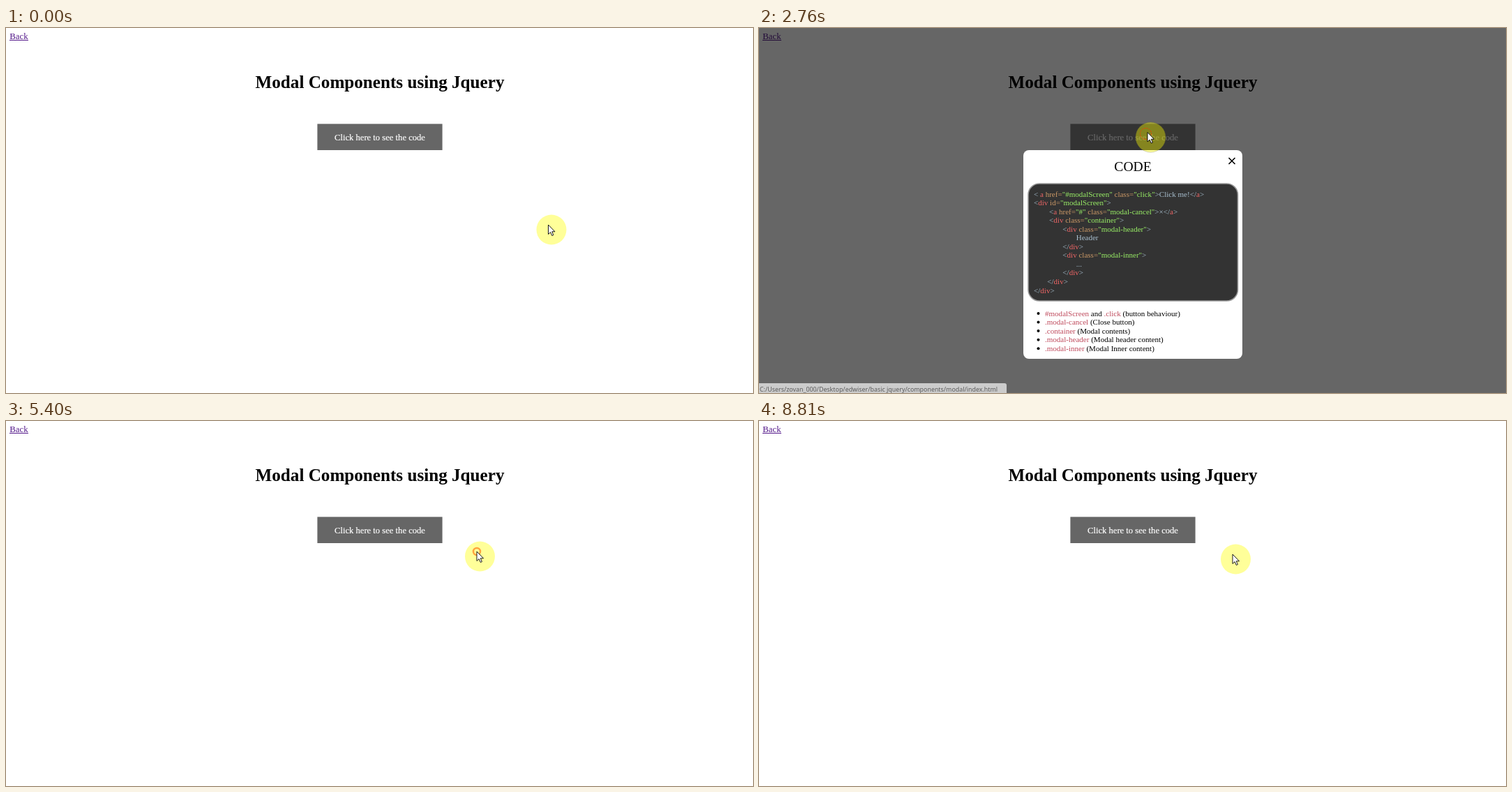
Recreate the animation shown at these times as an HTML page. Size 1071x523 px, loop 8910 ms.

```html
<!DOCTYPE html>
<html lang="en">
<head>
<meta charset="utf-8">
<title>Modal Components</title>
<style>
  html, body { margin: 0; width: 100%; height: 100%; overflow: hidden; background: #fff; }
  svg { display: block; font-family: "Liberation Serif", "Times New Roman", serif; }
  text { white-space: pre; }
  .mid { text-anchor: middle; }
  #code, #list { font-size: 11.04px; }
  #code { fill: #a9c0d0; }
  .tag { fill: #ee6666; }
  .attr { fill: #cc9966; }
  .str { fill: #99ee66; }
  .sel { fill: #bf4a5c; }
  #bar text { font: 8.87px "Noto Sans", "Open Sans", sans-serif; fill: #555; }
  #pointer path { fill: #fff; stroke: #000; stroke-width: .9; stroke-linejoin: round; }
</style>
</head>
<body>
<svg width="1071" height="523" viewBox="0 0 1071 523">
  <text x="5.3" y="15.5" font-size="12.8" fill="#551a8b">Back</text>
  <path d="M5 17.5H32" stroke="#551a8b"/>
  <text class="mid" x="536" y="86" font-size="25.15" font-weight="bold">Modal Components using Jquery</text>
  <rect id="button" x="446.4" y="137.4" width="179.200" height="37.600"/>
  <text class="mid" x="536" y="160.5" font-size="12.62" fill="#fff" stroke="#fff" stroke-width=".2">Click here to see the code</text>

  <g id="modal">
    <rect width="1071" height="523" opacity=".6"/>
    <rect x="379" y="175" width="314" height="299" rx="8" fill="#fff"/>
    <text class="mid" x="536" y="205" font-size="19.6">CODE</text>
    <path d="M673.5 186l9 9m0-9l-9 9" stroke="#000" stroke-width="1.6"/>
    <rect x="386" y="223" width="300.5" height="168" rx="16" fill="#333" stroke="#999" stroke-width="1.6"/>
    <g id="code"></g>
    <g id="list"></g>
  </g>

  <g id="bar">
    <path d="M0 523V509H352Q355 509 355 512V523Z" fill="#fff"/>
    <path id="edge" d="M0 508.5H353M355.5 511V523" stroke="#bbb"/>
    <text x="1" y="520.5">C:/Users/zovan_000/Desktop/edwiser/basic jquery/components/modal/index.html</text>
  </g>

  <circle id="halo" r="21.5" fill="#ff0" stroke="#663"/>
  <circle id="ring" fill="none"/>
  <g id="pointer">
    <path id="arrow" d="M0 0V13.500L3.100 10.600 5.300 15.500 7.400 14.600 5.300 9.800H9.500Z"/>
    <path id="hand" transform="translate(2.5 -1.500)"
      d="M-1.500 10V1.500Q0-.5 1.500 1.500V6Q3 5 4 6.500Q5.500 5.500 6.300 7Q8 6.500 8 8.500V12L6.500 15V17H-.5V15L-4.500 10.500Q-4.500 8-1.500 10Z"/>
  </g>
</svg>
<script>
const $ = id => document.getElementById(id);
const LOOP = 8910, REST = 1000, STEP = 110, LINE = 12.55;

const code = `< a href="#modalScreen" class="click">Click me!</a>
<div id="modalScreen">
        <a href="#" class="modal-cancel">×</a>
        <div class="container">
               <div class="modal-header">
                      Header
               </div>
               <div class="modal-inner">
                      ...
               </div>
       </div>
</div>`;
const notes = `#modalScreen and .click (button behaviour)
.modal-cancel (Close button)
.container (Modal contents)
.modal-header (Modal header content)
.modal-inner (Modal Inner content)`;

const span = (kind, s) => `<tspan class="${kind}">${s}</tspan>`;
const paintCode = line => line.replace(/("[^"]*")|(\w+=)|(<\/? ?)(\w+)/g, (_, str, attr, open, tag) =>
  str ? span('str', str) : attr ? span('attr', attr) : open.replace('<', '&lt;') + span('tag', tag));
const paintNote = line => line.replace(/[#.][\w-]+/g, s => span('sel', s));

function typeset(id, source, x, top, paint, bullet = '') {
  $(id).innerHTML = source.split('\n').map((line, i) =>
    `<g transform="translate(${x} ${top + i * LINE})">${bullet}<text>${paint(line)}</text></g>`).join('');
}
typeset('code', code, 394, 241.5, paintCode);
typeset('list', notes, 410, 412.5, paintNote, '<circle cx="-9.5" cy="-3.5" r="2"/>');

// pointer moves: start, end, and where the halo centre arrives
const home = [782, 289];
const moves = [
  [890, 1880, 559, 158.5], [2430, 2540, 561.5, 156.5],
  [3200, 3860, 597, 334.5], [4300, 5290, 679.5, 194],
  [5400, 5840, 592, 175], [6500, 6610, 599, 174],
  [6720, 7270, 675.5, 197], [7710, 8260, 683.5, 198]
];
// click rings: start, moment of widening
const clicks = [[2320, 2430], [2540, 2760], [5400, 5510], [6390, 6500], [6610, 6830], [8370, 8480]];
const opened = [[2540, 5400], [6610, 8480]];
const hovers = [[1770, 2760], [5950, 6830], [7490, 8590]];

const clamp = v => Math.min(1, Math.max(0, v));
const within = (v, a, b) => v >= a && v < b;
const inside = (x, y, l, t, r, b) => within(x, l, r) && within(y, t, b);
const show = (id, on) => $(id).setAttribute('visibility', on ? 'visible' : 'hidden');
const set = (id, attrs) => {
  for (const k in attrs) $(id).setAttribute(k, attrs[k]);
};

const position = t => moves.reduce(([x, y], [start, end, toX, toY]) => {
  const u = clamp((t - start) / (end - start)), ease = u * u * (3 - 2 * u);
  return [x + (toX - x) * ease, y + (toY - y) * ease];
}, home);

function tip(t) {
  const [x, y] = position(t);
  return [x - 4.5, y - 7];
}

function drawRing(t) {
  const click = clicks.find(([start, widen]) => within(t, start, widen + STEP));
  show('ring', click);
  if (!click) return;
  const [cx, cy] = tip(click[0] - STEP), wide = t >= click[1];
  set('ring', {
    cx, cy,
    r: wide ? 8 : 5,
    stroke: wide ? '#f30' : '#f60',
    'stroke-width': wide ? 1 : 2.5,
    'stroke-dasharray': wide ? '2 1.5' : 'none',
    'stroke-opacity': wide ? .9 : .6
  });
}

function draw(t) {
  const open = opened.some(([from, to]) => within(t, from, to));
  show('modal', open);
  set('button', { fill: open ? '#808080' : '#666' });

  const [cx, cy] = position(t), [x, y] = tip(t);
  const onCode = open && inside(cx, cy, 386, 223, 687, 391);
  const onButton = !open && inside(x, y, 446, 137, 626, 175);
  set('halo', { cx, cy, 'fill-opacity': onCode ? .25 : .4, 'stroke-opacity': open && !onCode ? .3 : 0 });
  set('pointer', { transform: `translate(${x} ${y})` });
  show('hand', onButton);
  show('arrow', !onButton);
  drawRing(t);

  const fade = Math.max(...hovers.map(([on, off]) =>
    Math.min(clamp((t - on + STEP) / 2 / STEP), clamp(1 - (t - off + STEP) / 3 / STEP))));
  set('bar', { opacity: fade });
  show('edge', !open);
}

function frame() {
  const t = performance.now() % LOOP;
  draw(t < REST ? 0 : REST + Math.floor((t - REST) / STEP) * STEP);
  requestAnimationFrame(frame);
}
frame();
</script>
</body>
</html>
```
